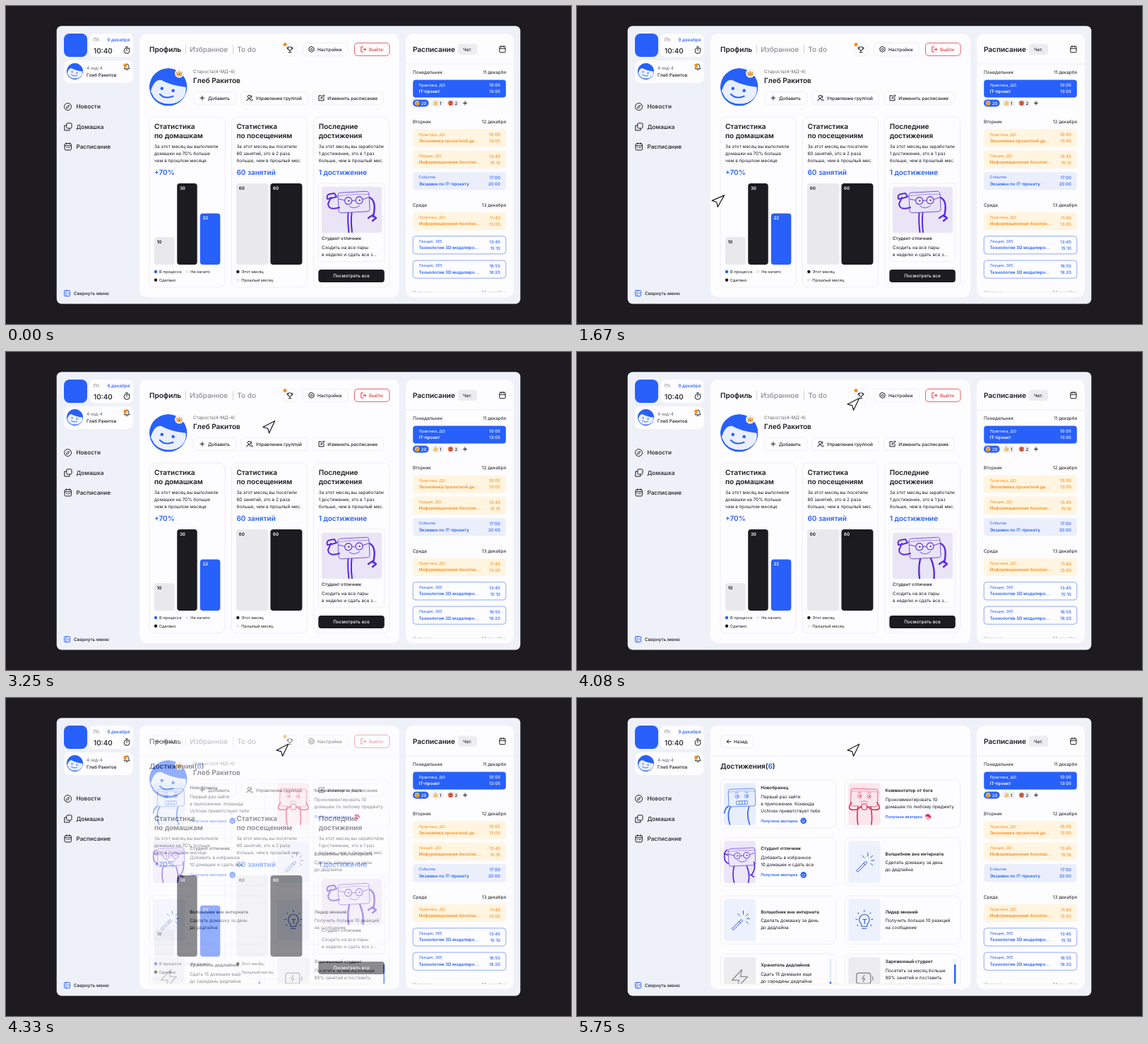
An HTML page that plays this animation: 800 px wide and 450 px high, repeating every 6160 ms.

```html
<!DOCTYPE html>
<html lang="ru">
<head>
<meta charset="utf-8">
<title>Личный кабинет студента</title>
<style>
html, body { margin: 0; width: 100%; height: 100%; overflow: hidden; background: #1d1b20; }
svg { display: block; width: 800px; height: 450px; font-family: Inter, sans-serif; }
text { white-space: pre; text-rendering: geometricPrecision; }
</style>
</head>
<body>
<svg id="stage" viewBox="0 0 800 450"></svg>
<script>
const INK = '#1b1b20', BLUE = '#2860fb', GRAY = '#68686f', PAPER = '#fdfcfe',
  BACK = '#eff1f9', LINE = '#ecebf1', RED = '#e5383d', ORANGE = '#fa8c1c', VIOLET = '#5a2bdb';

// y is the vertical middle of the capitals
const text = (x, y, str, size = 6.4, weight = 400, fill = INK, anchor = 'start') =>
  `<text x="${x}" y="${(y + size * .364).toFixed(2)}" font-size="${size}" font-weight="${weight}" fill="${fill}" text-anchor="${anchor}">${str}</text>`;
const lines = (x, y, list, step = 10) => list.map((s, i) => text(x, y + i * step, s)).join('');
const rect = (x, y, w, h, r, fill, stroke = 'none', sw = .8) =>
  `<rect x="${x}" y="${y}" width="${w}" height="${h}" rx="${r}" fill="${fill}" stroke="${stroke}" stroke-width="${sw}"/>`;
const dot = (x, y, r, fill, stroke = 'none', sw = .9) =>
  `<circle cx="${x}" cy="${y}" r="${r}" fill="${fill}" stroke="${stroke}" stroke-width="${sw}"/>`;
const path = (d, stroke = INK, sw = 1, fill = 'none') =>
  `<path d="${d}" fill="${fill}" stroke="${stroke}" stroke-width="${sw}" stroke-linecap="round" stroke-linejoin="round"/>`;
const at = (x, y, body, scale = 1, turn = 0) =>
  `<g transform="translate(${x} ${y}) rotate(${turn}) scale(${scale})">${body}</g>`;
const button = (x, y, w, h, icon, label, labelX, color = INK, border = LINE) =>
  rect(x, y, w, h, 4.5, PAPER, border) + icon + text(labelX, y + h / 2, label, 6.4, 500, color);

const avatar = (x, y, r) => at(x, y, `<g clip-path="url(#disc)">` + dot(0, 0, 27, BLUE) +
  path('M-25 6Q-20-12-10-10Q4-2 25 0Q27 15 12 22Q-8 28-20 15Z', 'none', 0, '#e9effd') + '</g>' +
  dot(-9, 2, 2.3, BLUE) + dot(7, 5, 2.3, BLUE) + path('M-12 10Q-4 18 7 13', BLUE, 2), r / 27);

const crown = (x, y, s) => at(x, y, dot(0, 0, 6, '#f4f1f3') +
  path('M-3.2 2.8L-3.6-2L-1.4 0L0-3.2L1.6 0L3.6-2L3.2 2.8Z', '#d98a1e', .5, '#f6b13c') +
  dot(0, 1.5, .8, '#b5543a'), s);

const face = (color, mouth, glasses = false) =>
  rect(-20, -13, 40, 26, 3.5, 'none', color, .7) +
  path('M-20-9Q0-11 20-9', color, .4) +
  [-7, 7].map(x => dot(x, -2, glasses ? 4.6 : 2.8, 'none', color, glasses ? 1 : .6) + dot(x + .6, -2, 1.1, color)).join('') +
  (glasses ? path('M-2-2H2M-12-3L-19-5M12-3L19-5', color, .8) : path('M-10-7L-5-8M5-8L10-7', color, .6)) +
  path(mouth, color, .7);
const SMILE = 'M-6 5Q0 10 7 5', TEETH = 'M-8 5H8V10H-8ZM-4 5V10M0 5V10M4 5V10';

/* ---------- frame, menu, timetable ---------- */
const menu = () => {
  const items = [
    [142.5, 'Новости', dot(87.5, 142.5, 5, 'none', INK, 1) + path('M85.5 144.5L86.6 141.5L89.6 140.5L88.5 143.5Z', INK, .8)],
    [171, 'Домашка', rect(85.8, 165.8, 7.2, 7.2, 1.3, 'none', INK, 1) + path('M85.5 169H82.8V176H90V173.5')],
    [199, 'Расписание', rect(83, 194.7, 9.4, 9.2, 1.5, 'none', INK, 1) + path('M83 197.8H92.4M85.5 193.7V195.5M90 193.7V195.5M85.5 200.4H86M88 200.4H90')],
  ];
  return rect(82, 39, 33, 33, 8, BLUE) +
    rect(118, 39, 62, 33, 8, PAPER) + text(124, 48, 'Пт.', 6.4, 400, GRAY) +
    text(175.3, 48, '9 декабря', 6.4, 500, BLUE, 'end') + text(124, 63, '10:40', 10, 500) +
    dot(171, 63.3, 3.9, 'none', INK, 1) + path('M171 63.3V61M169.5 57.8H172.5M174.5 59.5L175.2 60.2') +
    rect(82, 77, 98, 32, 8, PAPER) + avatar(97.5, 92.5, 11.7) +
    text(114, 88, '4-мд-4', 6.4, 400, GRAY) + text(114, 98, 'Глеб Ракитов', 6.4, 500) +
    path('M167.5 88.5Q169 87 168.6 84.5Q169 82 171 82Q173.5 82 173.6 84.5Q173.3 87 174.8 88.5ZM170 90.2H172.2', INK, .9) +
    dot(168.8, 84, 2.5, ORANGE) +
    items.map(([y, label, icon]) => icon + text(99.5, y, label, 8.2, 500)).join('') +
    rect(82.5, 402.5, 8, 8, 1, 'none', BLUE, 1) + path('M85 402.5V410.5M88.8 405L87.2 406.5L88.8 408', BLUE, .9) +
    text(96, 406.5, 'Свернуть меню', 6.4, 500);
};

const event = (y, kind, title, from, to, style) => {
  const [fill, border, color] = {
    full: [BLUE, 'none', '#fff'], warm: ['#fff5e0', 'none', ORANGE],
    cool: ['#ebeffc', 'none', BLUE], plain: [PAPER, '#5c86fb', BLUE],
  }[style];
  return rect(576.2, y, 131.6, 25.2, 4, fill, border, .7) +
    text(584.5, y + 7.4, kind, 5.5, 400, color) + text(584.5, y + 16.5, title, 6.2, 600, color) +
    text(699.8, y + 7.8, from, 6, 500, color, 'end') + text(699.8, y + 16.8, to, 6, 500, color, 'end');
};
const day = (y, name, date) => text(576, y, name) + text(708, y, date, 6.4, 400, INK, 'end');

const timetable = () => rect(566, 39, 153, 373, 10, PAPER) +
  text(576, 61.3, 'Расписание', 10, 600) + rect(640, 53.5, 27, 15.5, 4, '#ededf0') +
  text(653.5, 61.3, 'Чет.', 6.4, 500, INK, 'middle') +
  rect(698.8, 57.3, 8.2, 8.4, 1.2, 'none', INK, 1) + path('M698.8 60.2H707M701 56.2V58M704.8 56.2V58') +
  path('M566 82H719', LINE, .8) +
  day(94, 'Понедельник', '11 декарбя') +
  event(104.4, 'Практика, ДО', 'IT-проект', '10:05', '13:05', 'full') +
  rect(576, 132.4, 22.5, 10, 5, BLUE) + dot(582, 137.4, 3.4, '#f5b545') +
  path('M580.5 136.8H581M583 136.8H583.5M580.7 139Q582 138 583.4 139', '#7b4a1d', .7) + text(587.7, 137.5, '20', 6, 500, '#fff') +
  rect(602, 132.4, 18, 10, 5, '#efeff3') + path('M606 137.2L608.5 133.8L608.8 136.3H611L610.5 140.2H606Z', '#e3a13b', .4, '#f7c667') + text(614, 137.5, '1', 6, 500) +
  rect(624, 132.4, 18, 10, 5, '#efeff3') + dot(629.5, 137.4, 3.4, '#e5653b') +
  path('M627.8 136L629 136.7M631.3 136L630 136.7M628.2 139.2H630.8', '#6e2419', .7) + text(635.5, 137.5, '2', 6, 500) +
  path('M647.5 137.4H652.5M650 134.9V139.9') +
  day(163.5, 'Вторник', '12 декабря') +
  event(174.2, 'Практика, ДО', 'Экономика проектной де...', '10:05', '13:05', 'warm') +
  event(204.6, 'Лекция, ДО', 'Информационная безопас...', '13:45', '15:10', 'warm') +
  event(235, 'Событие', 'Экзамен по IT-проекту', '17:00', '20:00', 'cool') +
  day(281.3, 'Среда', '13 декабря') +
  event(291.7, 'Практика, ДО', 'Информационная безопас...', '11:40', '13:05', 'warm') +
  event(325.7, 'Лекция, 365', 'Технологии 3D моделиро...', '13:45', '15:10', 'plain') +
  event(360, 'Лекция, 365', 'Технологии 3D моделиро...', '16:55', '18:20', 'plain') +
  `<g clip-path="url(#fold)">${day(406, 'Четверг', '14 декабря')}</g>` +
  path('M576 404.8H708', LINE, .7);

/* ---------- profile page ---------- */
const bar = (x, y, w, fill, value, color) => rect(x, y, w, 366 - y, 4, fill) + text(x + 3.7, y + 6.7, value, 6.2, 600, color);
const key = (x, y, fill, label) => dot(x, y, 2.2, fill) + text(x + 5, y, label, 5.6);
const statCard = (x, title, body, sum) => rect(x, 157, 107, 241, 8, PAPER, LINE) +
  title.map((s, i) => text(x + 7, 170.6 + i * 13, s, 10, 600)).join('') +
  lines(x + 7, 199, body) + text(x + 7, 235.5, sum, 10, 600, BLUE);

const profile = () => rect(189, 39, 368, 373, 10, PAPER) +
  text(203, 61.3, 'Профиль', 10, 600) + text(260.3, 61.3, 'Избранное', 10, 400, '#7d7d84') +
  text(327.3, 61.3, 'To do', 10, 400, '#7d7d84') + path('M254.5 55.5V67.5M321.5 55.5V67.5', '#c9c8ce', .8) +
  rect(393, 52.5, 18, 18, 4.5, PAPER, LINE) +
  path('M399.5 58H404.5V60.5Q404.3 63 402 63Q399.7 63 399.5 60.5ZM402 63V65.5M400 65.7H404M399.5 59H397.8Q398 61.3 399.8 61.4M404.5 59H406.2Q406 61.3 404.2 61.4', INK, .9) +
  dot(395, 54.5, 2.5, ORANGE) +
  button(420.5, 52.3, 64, 18, path('M432.5 57.4L436 59.4V63.3L432.5 65.3L429 63.3V59.4Z') + dot(432.5, 61.4, 1.4, 'none', INK), 'Настройки', 441) +
  button(493.5, 52.3, 49.5, 18, path('M505.5 57.8H502.8V65H505.5M505.5 61.4H509.5M507.7 59.5L509.6 61.4L507.7 63.3', RED), 'Выйти', 514, RED, RED) +
  avatar(229.7, 114.8, 26.8) + crown(245.3, 95.3, 1.05) +
  text(265, 92.3, 'Староста(4-МД-4)', 6.4, 400, GRAY) + text(265, 105.8, 'Глеб Ракитов', 10, 600) +
  button(265.3, 121.2, 60.4, 18, path('M275 130.2H280.6M277.8 127.4V133'), 'Добавить', 286) +
  button(332.7, 121.2, 94.6, 18, dot(344.2, 128.3, 2, 'none', INK, 1) + path('M340.8 134Q341 131.3 344 131.3Q347 131.3 347.3 134M347 126.5Q349 127.8 347.3 130M348 131.6Q349 132.3 349.2 134'), 'Управление группой', 353.5) +
  button(434.6, 121.2, 99.4, 18, path('M446.5 126.8H443V133.8H450V130.5M446 130.8L446.3 129.2L449.8 125.7L451 127L447.5 130.5Z'), 'Изменить расписание', 455.3) +
  statCard(203, ['Статистика', 'по домашкам'], ['За этот месяц вы выполняли', 'домашки на 70% больше', 'чем в прошлом месяце'], '+70%') +
  bar(210, 327, 28.5, '#e9e9ec', '10', INK) + bar(242.2, 251, 28.5, INK, '30', '#fff') + bar(274.8, 293.5, 28.5, BLUE, '22', '#fff') +
  key(212, 376, BLUE, 'В процессе') + key(256.3, 376, '#e9e9ec', 'Не начато') + key(212, 387.8, INK, 'Сделано') +
  statCard(319.4, ['Статистика', 'по посещениям'], ['За этот месяц вы посетили', '60 занятий, это в 2 раза', 'больше, чем в прошлый мес.'], '60 занятий') +
  bar(326, 251, 45.3, '#e9e9ec', '60', INK) + bar(374.4, 251, 45, INK, '60', '#fff') +
  key(328.3, 376, INK, 'Этот месяц') + key(328.3, 387.8, '#e9e9ec', 'Прошлый месяц') +
  statCard(435.7, ['Последние', 'достижения'], ['За этот месяц вы заработали', '1 достижение, это в 1 раз', 'больше, чем в прошлый мес.'], '1 достижение') +
  rect(442.3, 250.7, 93.5, 111, 5, PAPER, LINE) + rect(447, 255.7, 85, 65, 3, '#e9e5f6') +
  at(492.5, 277.5, face(VIOLET, SMILE, true), 1.1, -3) +
  path('M472 285Q457 290 456 280L460 271M455 273Q453 267 459 266L465 265L468 270L461 272Z', VIOLET, 2) +
  path('M515 271Q525 276 520 298M513 300L519 296L524 300L519 304', VIOLET, 2.4) +
  `<g id="legsNarrow">${path('M484.5 293Q483.5 305 485.5 320M489.5 293Q488 305 490 320', VIOLET, 2)}</g>` +
  `<g id="legsWide">${path('M486 293Q483 306 485 320M501 292Q507 306 505.5 320', VIOLET, 2.4)}</g>` +
  text(447, 329, 'Студент отличник', 6.3, 500) + lines(447, 341.7, ['Сходить на все пары', 'в неделю и сдать все з...']) +
  rect(442.3, 373, 93.5, 18, 4, INK) + text(489, 382, 'Посмотреть все', 6.4, 500, '#fff', 'middle');

/* ---------- achievements page ---------- */
const award = (x, y, tint, art, title, titleY, body, bonus = '') =>
  rect(x, y, 163.3, 68.3, 8, PAPER, LINE) + rect(x + 4.7, y + 4.7, 45.3, 59.3, 4, tint) + at(x + 27.3, y + 34.3, art) +
  text(x + 57, titleY, title, 6.3, 600) + lines(x + 57, titleY + 12.7, body) +
  (bonus && text(x + 57, titleY + 17.2 + body.length * 10, 'Получена аватарка', 5.4, 600, BLUE) + at(x + 117.5, titleY + 17.2 + body.length * 10, bonus));

const blueBadge = dot(0, 0, 4.3, BLUE) + path('M-2-1H-1M1-1H2M-2 1.5Q0 3 2 1', '#e9effd', .9);
const redBadge = dot(0, 0, 4.3, '#f9dfe6') + path('M-4-1Q-3-5 1-4Q5-2 4 2Q1-1-4-1Z', 'none', 0, '#df2a57') + path('M-1.5 2Q0 3 1.5 2', '#df2a57', .8);
const wand = path('M-11 12L2-1L4 1L-9 14ZM-1 2L1 4M5-13V-8M14-2H10M12-9L9-6M-3-9L0-6M12 5L9 2', '#2d55c9', 1);
const bulb = path('M-4 9V6Q-8 2-7-2Q-5-8 0-8Q6-8 7-2Q8 2 4 6V9ZM-3 12H3M-2-1H3M.5-1V5M0-14V-12M-12-1H-10M10-1H12M-9-10L-8-9M9-10L8-9M-10 8L-9 7M10 8L9 7', '#2d55c9', 1.1);
const bolt = path('M3-12L-11 3H-1L-4 14L11-2H1Z', '#8b8b92', 1.3);
const battery = rect(-11, -7, 20, 15, 3, 'none', '#8b8b92', 1.4) + path('M12-2V3M0-4L-3 1H1L-2 5', '#8b8b92', 1.3);

const blueMascot = at(3, -9, face('#2f63e6', TEETH), .95, -2) +
  path('M-13 4Q-19 14-14 29M13 4Q9 15 14 29M-16 3Q-21 6-22 13', '#2f63e6', 1.6);
const redMascot = at(0, -9, face('#dd2d58', 'M-5 7Q0 3 5 7'), .95, 2) +
  path('M-18-2Q-27 10-12 8L-4 4M18-2Q27 10 12 8L4 4M-9 4Q-11 18-9 29M9 4Q12 18 10 29', '#dd2d58', 1.6) + rect(-3.5, 0, 7, 8, 1, '#fbe6ec', '#dd2d58', 1);
const violetMascot = at(3, -7, face(VIOLET, SMILE, true), .95, -3) +
  path('M-16 2Q-24 0-21-14L-18-17M-22-12L-17-10M-8 6Q-11 17-8 29M10 6Q15 19 12 29M20 0Q23 9 17 18M15 18L20 21', VIOLET, 1.7);

const awards = () => {
  const L = 203.2, R = 379.5, cool = '#edf1fd', dull = '#ededef';
  const wizard = ['Сделать домашку за день', 'до дедлайна'];
  return rect(189, 39, 368, 373, 10, PAPER) +
    button(203.2, 53, 46.5, 17.5, path('M212.3 61.7H218M214.6 59.3L212.2 61.7L214.6 64.1'), 'Назад', 222) +
    path('M189 82H557', LINE, .8) +
    text(203, 96, `Достижения(<tspan fill="${BLUE}">6</tspan>)`, 10, 600) +
    '<g clip-path="url(#fold)">' +
    award(L, 115.7, '#e8eefc', blueMascot, 'Новобранец', 126.5, ['Первый раз зайти', 'в приложение. Команда', 'Uchivex приветствует тебя'], blueBadge) +
    award(R, 115.7, '#fbe6ec', redMascot, 'Комментатор от бога', 131.2, ['Прокомментировать 10', 'домашек по любому предмету'], redBadge) +
    award(L, 197.7, '#ebe6f8', violetMascot, 'Студент отличник', 213.2, ['Добавить в избранное', '10 домашек и сдать все'], blueBadge) +
    award(R, 197.7, cool, wand, 'Волшебник вне интерната', 220.3, wizard) +
    award(L, 279.9, cool, wand, 'Волшебник вне интерната', 302.3, wizard) +
    award(R, 279.9, cool, bulb, 'Лидер мнений', 302.3, ['Получить больше 10 реакций', 'на сообщение']) +
    award(L, 362, dull, bolt, 'Хранитель дедлайнов', 377.5, ['Сдать 15 домашек еще', 'до середины дедлайна']) +
    award(R, 362, dull, battery, 'Заряженный студент', 372.5, ['Посетить за месяц больше', '90% занятий и поставить', 'реакцию на каждую пару']) +
    rect(357.7, 369.5, 2.4, 50, 1.2, '#e6ebfa') + rect(357.7, 401.5, 2.4, 20, 1.2, BLUE) +
    rect(534, 369.5, 2.4, 50, 1.2, '#e6ebfa') + rect(534, 377, 2.4, 45, 1.2, BLUE) +
    '</g>' + path('M203 404.8H543', LINE, .7);
};

document.getElementById('stage').innerHTML =
  `<defs><clipPath id="disc"><circle r="27"/></clipPath><clipPath id="fold"><path d="M189 83H719V404.5H189Z"/></clipPath></defs>` +
  rect(0, 0, 800, 450, 0, '#1d1b20') + rect(71.7, 28.2, 656.6, 393.4, 7, BACK) +
  menu() + timetable() + profile() + `<g id="awards">${awards()}</g>` +
  `<g id="cursor">${path('M12 0L-6-6L-2.5 0L-6 6Z', INK, 1.2, PAPER)}</g>`;

/* ---------- motion ---------- */
const LOOP = 6160, STEP = 1000 / 12;
// time, x, y, heading
const route = [
  [0, -22, 408, -14], [670, 53, 394, -18], [920, 109.5, 368, -23], [1330, 184, 312, -36],
  [2000, 211, 247, -45], [2420, 228.5, 223, -46], [2670, 262, 197, -46], [3330, 378, 99.5, -46], [4000, 391.4, 73.8, -46],
];

// cubic through the route points that never overshoots
function along(t, k) {
  const last = route.length - 1;
  if (t >= route[last][0]) return route[last][k];
  const secant = i => (route[i + 1][k] - route[i][k]) / (route[i + 1][0] - route[i][0]);
  const slope = i => {
    if (i === 0) return secant(0);
    if (i === last) return 0;
    const a = secant(i - 1), b = secant(i);
    return a * b > 0 ? 2 * a * b / (a + b) : 0;
  };
  const i = route.findIndex((p, n) => t < route[n + 1][0]);
  const span = route[i + 1][0] - route[i][0], u = (t - route[i][0]) / span, v = 1 - u;
  return route[i][k] * (1 + 2 * u) * v * v + route[i + 1][k] * u * u * (3 - 2 * u) +
    span * (slope(i) * u * v * v - slope(i + 1) * u * u * v);
}

const $ = id => document.getElementById(id);
const cursor = $('cursor'), overlay = $('awards'), narrow = $('legsNarrow'), wide = $('legsWide');

function draw(now) {
  const t = Math.floor((now % LOOP + 3.4) / STEP) * STEP;
  cursor.setAttribute('transform', `translate(${along(t, 1)} ${along(t, 2)}) rotate(${along(t, 3)})`);
  overlay.setAttribute('opacity', Math.min(1, Math.max(0, (t - 4083.4) / 500)));
  narrow.setAttribute('opacity', t < 4080 ? 1 : 0);
  wide.setAttribute('opacity', t < 4080 ? 0 : 1);
}

let start;
function tick(now) {
  start ??= now;
  draw(now - start);
  requestAnimationFrame(tick);
}
draw(0);
requestAnimationFrame(tick);
</script>
</body>
</html>
```
